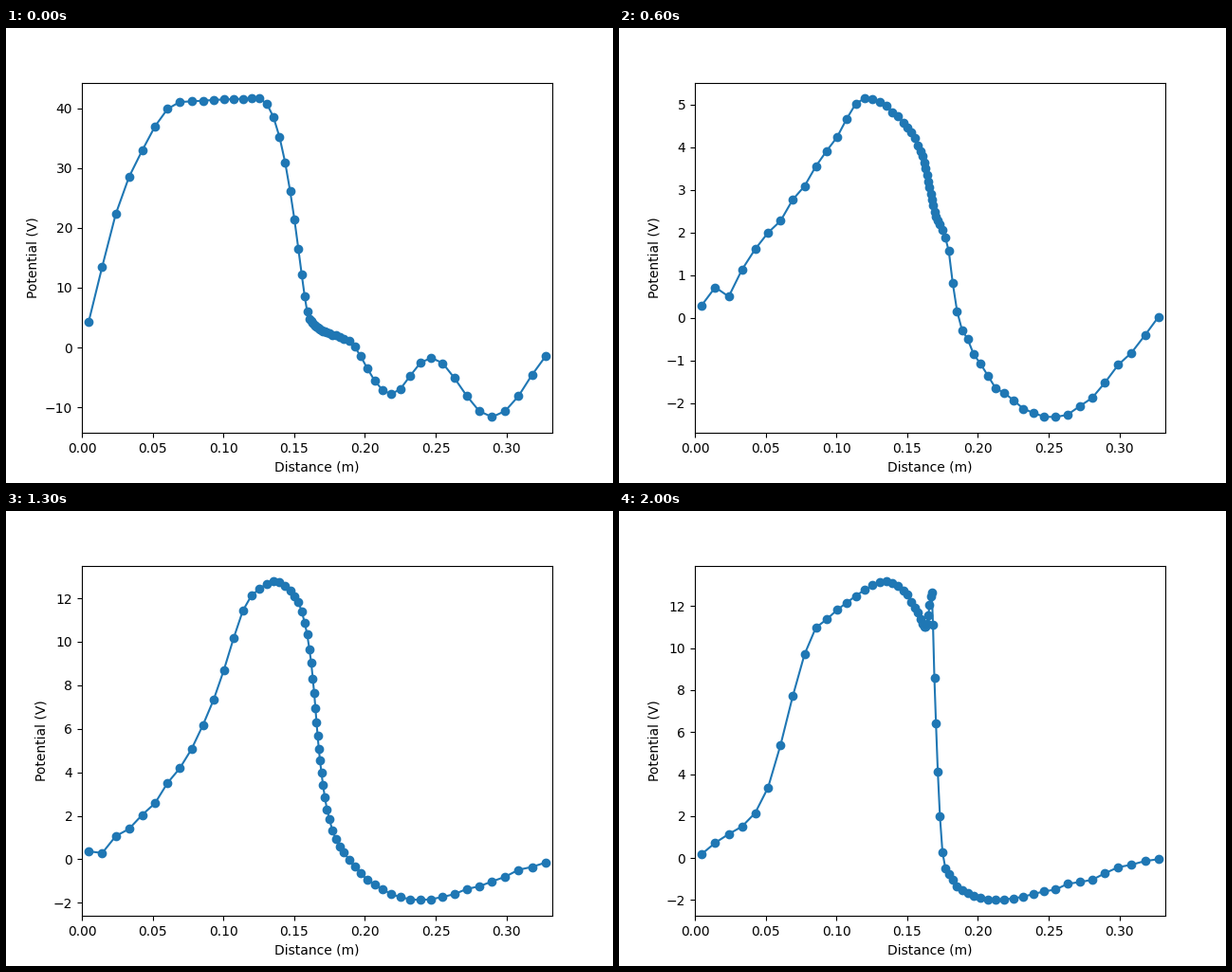
Recreate the animation shown at these times as a matplotlib script. Size 640x480 px, loop 2.1 s.

```python
import numpy as np
import matplotlib.pyplot as plt
from matplotlib.animation import FuncAnimation

FRAMES, STEP_MS = 21, 100
CELLS, LENGTH = 64, 0.3324
NOISE = 0.07

# Cell centres, packed towards the middle of the gap
cell = np.arange(CELLS)
u = (cell + 0.5) / CELLS
density = 1 + 0.85 * np.cos(2 * np.pi * u)
x = LENGTH * (u + 0.85 * np.sin(2 * np.pi * u) / (2 * np.pi))

# Turning points of the potential at a few moments: cells, volts
POSES = {
    0: ([3, 7, 15, 26, 44, 50, 54, 59],
        [28.5, 41, 41.6, 4.8, 1.1, -7.8, -1.6, -11.6]),
    2: ([3, 7, 12, 21, 36, 43, 50, 56],
        [1.1, 1.85, 2.44, 1.2, 0.68, -1.0, -2.6, -3.19]),
    6: ([6, 10, 14, 19, 35, 40, 44, 55],
        [2.2, 3.9, 5.14, 4.7, 2.5, 1.9, -0.3, -2.32]),
    9: ([5, 9, 17, 21, 28, 36, 43, 54],
        [2.1, 4.1, 8.41, 7.1, 4.6, 3.3, -0.1, -1.81]),
    13: ([4, 9, 14, 17, 21, 33, 42, 53],
         [1.9, 6.1, 12.1, 12.77, 12.1, 5.1, 0.6, -1.87]),
    16: ([5, 11, 15, 20, 25, 32, 40, 50],
         [2.2, 10.7, 13.64, 12.9, 11.9, 5.9, 0.4, -2.11]),
    20: ([4, 9, 17, 28, 33, 35, 40, 49],
         [2.1, 10.9, 13.17, 11, 12.66, 8.55, -0.5, -2]),
}


def monotone(px, py, at):
    """Cubic through the points that never overshoots them."""
    h = np.diff(px)
    d = np.diff(py) / h
    a, b = d[:-1], d[1:]
    inner = (2 * np.sign(a) * np.maximum(a * b, 0)
             / (np.abs(a) + np.abs(b) + 1e-12))
    m = np.r_[d[0], inner, d[-1]]
    j = np.searchsorted(px, at, "right") - 1
    t = (at - px[j]) / h[j]
    s = t * t * (3 - 2 * t)
    return ((1 - s) * py[j] + s * py[j + 1]
            + h[j] * t * (1 - t) * ((1 - t) * m[j] - t * m[j + 1]))


def turning_points(frame):
    """Slide the turning points between poses; both walls are grounded."""
    times = list(POSES)
    a = max(k for k in times if k <= frame)
    b = min(k for k in times if k >= frame)
    w = (frame - a) / max(b - a, 1)
    if a == 0:
        w **= 0.15  # the start-up transient dies away at once
    px, py = (1 - w) * np.array(POSES[a]) + w * np.array(POSES[b])
    return np.r_[-0.5, px, CELLS - 0.5], np.r_[0, py, 0]


def potential(frame):
    px, py = turning_points(frame)
    lo, hi = py.min(), py.max()
    v = np.clip(monotone(px, py, cell), lo, hi)
    # Roughness fades out at the extremes, so they set the axis range
    fade = 2 * np.sqrt((hi - v) * (v - lo)) / (hi - lo)
    rough = np.random.default_rng(frame).normal(0, NOISE, CELLS)
    return np.clip(v + rough * density * fade, lo, hi)


fig, ax = plt.subplots(figsize=(6.4, 4.8), dpi=100)
line, = ax.plot(x, potential(0), "o-")
ax.set_xlim(0, LENGTH)
ax.set_xlabel("Distance (m)")
ax.set_ylabel("Potential (V)")


def update(frame):
    line.set_ydata(potential(frame))
    ax.relim()
    ax.autoscale_view(scalex=False)
    return line,


anim = FuncAnimation(fig, update, frames=FRAMES, interval=STEP_MS,
                     repeat=True, repeat_delay=0)
plt.show()
```
